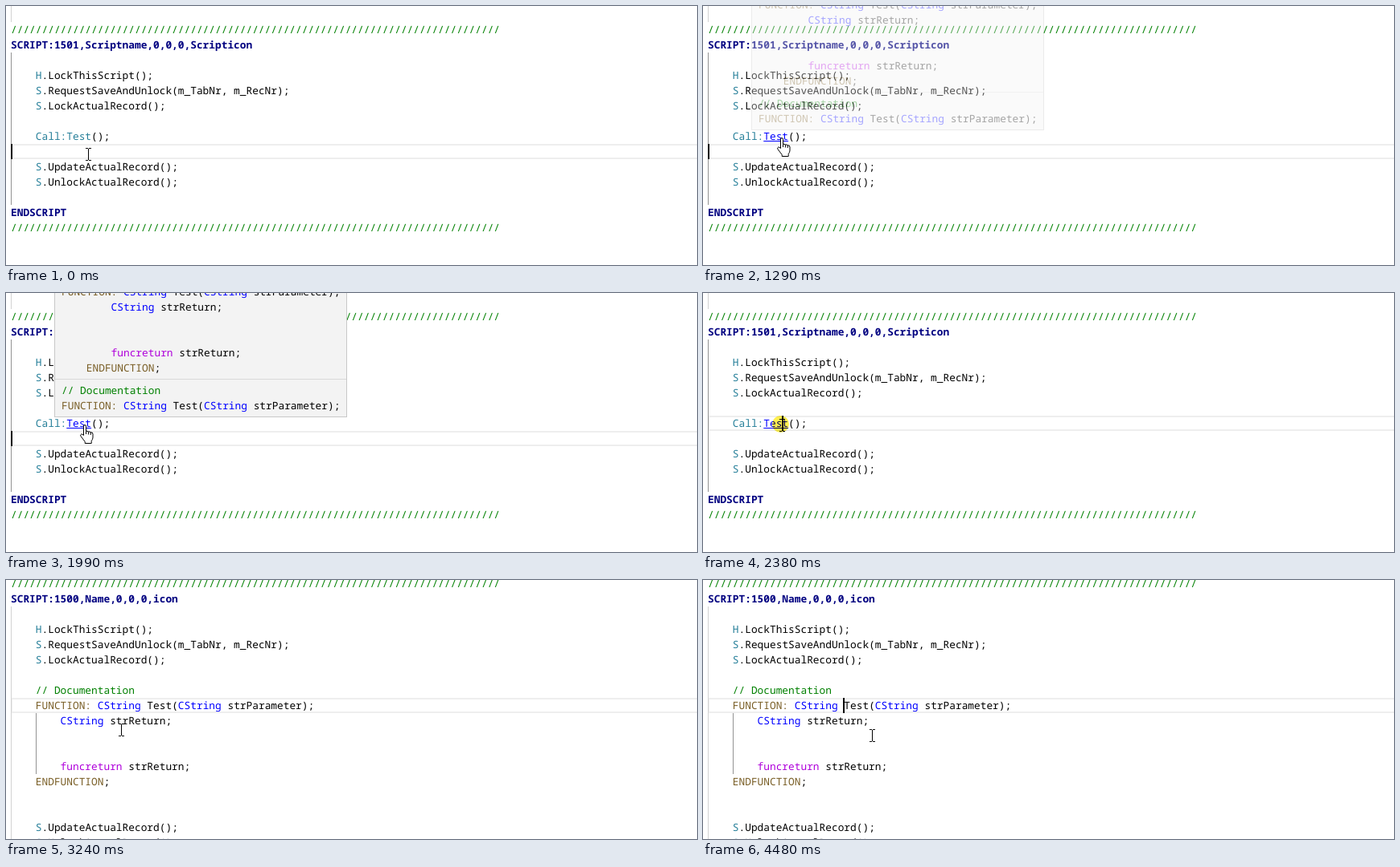
These frames come from a looping animation (859x323 px, 4550 ms). An HTML page:

```html
<!DOCTYPE html>
<html lang="en">
<head>
<meta charset="utf-8">
<title>Go to definition</title>
<style>
html, body { margin: 0; width: 100%; height: 100%; overflow: hidden; background: #fff; }
#stage { position: relative; width: 859px; height: 323px; overflow: hidden; }
#stage div, #stage svg { position: absolute; }
.line {
  left: 0; height: 19px; white-space: pre; color: #000;
  font: 12.83px/19px "Noto Sans Mono", "DejaVu Sans Mono", monospace;
  text-rendering: geometricPrecision; font-kerning: none; font-variant-ligatures: none;
}
.page { left: 0; top: 0; width: 859px; height: 323px; }
.head { color: #000080; font-weight: bold; }
.note { color: #008000; }
.type { color: #267f99; }
.func { color: #795e26; }
.word { color: #0000ff; }
.ret { color: #af00db; }
.link { color: #0000ff; text-decoration: underline; }
.row { left: 6px; width: 860px; height: 19px; box-sizing: border-box; border: 2px solid #eee; }
.guide { width: 1px; background: #d3d3d3; }
.guide.on { background: #939393; }
#caret { width: 2px; height: 19px; background: #000; }
#mark { left: 175px; top: 147px; width: 31px; height: 19px; background: #fdff0033; }
#click { left: 86px; top: 153px; width: 21px; height: 21px; border-radius: 50%; background: #fff04f; mix-blend-mode: multiply; }
#tip { left: 60px; top: -40px; width: 364px; height: 195px; box-sizing: border-box; border: 1px solid #c8c8c8; background: #f3f3f3; }
#tip hr { position: absolute; left: 0; top: 146px; width: 100%; height: 1px; margin: 0; border: 0; background: #d8d8d8; }
svg { left: 0; top: 0; overflow: visible; }
</style>
</head>
<body>
<div id="stage">
  <div class="page" id="caller"></div>
  <div class="page" id="callee"><div id="mark"></div></div>
  <div id="tip"><hr></div>
  <div id="click"></div>
  <div id="caret"></div>
  <svg id="beam" width="8" height="16" shape-rendering="crispEdges">
    <path d="M0 0h3v1h-3zM4 0h3v1h-3zM3 1h1v14h-1zM0 15h3v1h-3zM4 15h3v1h-3z"/>
  </svg>
  <svg id="hand" width="17" height="24" fill="#fff" stroke="#000" stroke-linejoin="round">
    <path d="M4.5 13.5V2.2Q4.5.6 6 .6T7.5 2.2V8.5Q9 7.6 10.4 9Q12 8.3 13.2 9.8Q16 9.3 16 12V16Q16 18.5 14.2 20.5V23.5H6.2V21.5L1 14.6Q0 12.6 1.6 12Q3 11.8 4.5 13.5Z"/>
    <path d="M7.5 8.5V12M10.4 9V12.5M13.2 9.8V13" fill="none"/>
  </svg>
</div>
<script>
const LOOP = 4550, LINE = 19;
const $ = id => document.getElementById(id);
const rule = "/".repeat(79);
const tag = (cls, text) => `<span class="${cls}">${text}</span>`;

function paint(text) {
  if (/^\s*\/\//.test(text)) return tag("note", text);
  if (/^(END)?SCRIPT/.test(text)) return tag("head", text);
  return text
    .replace(/^( *)(.*)$/, (all, pad, code) => pad + code
      .replace(/FUNCTION:|ENDFUNCTION|CString|funcreturn|^[HS](?=\.)|^Call:Test/g, word => {
        if (word === "Call:Test") return tag("type", 'Call:<span id="name">Test</span>');
        if (word === "CString") return tag("word", word);
        if (word === "funcreturn") return tag("ret", word);
        return tag(word.length > 1 ? "func" : "type", word);
      }));
}

function add(parent, cls, style) {
  const el = document.createElement("div");
  el.className = cls;
  for (const key in style) el.style[key] = style[key] + "px";
  parent.append(el);
  return el;
}

function write(parent, left, top, lines) {
  lines.forEach((text, i) => {
    if (text) add(parent, "line", { left, top: top + i * LINE }).innerHTML = paint(text);
  });
}

const caller = $("caller"), callee = $("callee"), tip = $("tip");
const row = add(caller, "row", { top: 172 });
add(callee, "row", { top: 147 });
add(caller, "guide", { left: 6, top: 0, height: 20 });
add(caller, "guide on", { left: 6, top: 58, height: 190 });
add(callee, "guide", { left: 6, top: 33, height: 290 });
add(callee, "guide on", { left: 37, top: 166, height: 76 });

const lock = [
  "",
  "    H.LockThisScript();",
  "    S.RequestSaveAndUnlock(m_TabNr, m_RecNr);",
  "    S.LockActualRecord();",
  ""
];
const unlock = ["    S.UpdateActualRecord();", "    S.UnlockActualRecord();"];
const note = "// Documentation";
const signature = "FUNCTION: CString Test(CString strParameter);";
const body = ["        CString strReturn;", "", "", "        funcreturn strReturn;", "    ENDFUNCTION;"];

write(caller, 6, 20, [
  rule, "SCRIPT:1501,Scriptname,0,0,0,Scripticon", ...lock,
  "    Call:Test();", "", ...unlock, "", "ENDSCRIPT", rule
]);
write(callee, 6, -5, [
  rule, "SCRIPT:1500,Name,0,0,0,icon", ...lock,
  "    " + note, "    " + signature, ...body, "", "", ...unlock
]);
// The tip's inner origin lies at (61, -39)
write(tip, 8, 28, [signature, ...body]);
write(tip, 8, 151, [note, signature]);

// [time, x, y] of the pointer
const path = [
  [0, 102, 185], [440, 101, 184], [520, 100, 183], [590, 99, 182], [670, 98, 180],
  [750, 97, 175], [820, 97, 169], [900, 97, 166], [980, 97, 164],
  [2380, 98, 165], [2540, 99, 167], [2840, 101, 167],
  [3010, 104, 170], [3090, 112, 176], [3160, 126, 182], [3240, 143, 187],
  [3320, 172, 192], [3390, 197, 194], [3470, 210, 194]
];
const blink = [[0, 1], [520, 0], [980, 1], [1530, 0], [1990, 1], [3010, 0], [3470, 1], [3930, 0], [4480, 1]];
const fade = [[0, 0], [1290, 0.35], [1360, 0.82], [1440, 1], [2380, 0]];

const at = (steps, t) => steps.findLast(step => step[0] <= t);
const show = (el, on) => { el.style.visibility = on ? "visible" : "hidden"; };
const move = (el, x, y) => { el.style.transform = `translate(${x}px,${y}px)`; };
const within = (t, from, to) => t >= from && t < to;

function draw(t) {
  const clicked = t >= 2380, jumped = t >= 2460;
  const pointing = within(t, 900, 2380);
  const [, x, y] = at(path, t);

  caller.style.display = jumped ? "none" : "block";
  callee.style.display = jumped ? "block" : "none";
  row.style.top = (clicked ? 153 : 172) + "px";
  $("name").className = t >= 900 ? "link" : "";
  tip.style.opacity = at(fade, t)[1];
  show($("mark"), within(t, 2460, 2840));
  show($("click"), within(t, 2380, 2540));

  show($("caret"), at(blink, t)[1]);
  if (jumped) move($("caret"), 174, 147);
  else if (clicked) move($("caret"), 98, 153);
  else move($("caret"), 6, 172);

  show($("hand"), pointing);
  show($("beam"), !pointing);
  move($("hand"), x - 5, y);
  move($("beam"), x - 3, y - 8);
}

const start = performance.now();
function tick() {
  draw((performance.now() - start) % LOOP);
  requestAnimationFrame(tick);
}
tick();
</script>
</body>
</html>
```
